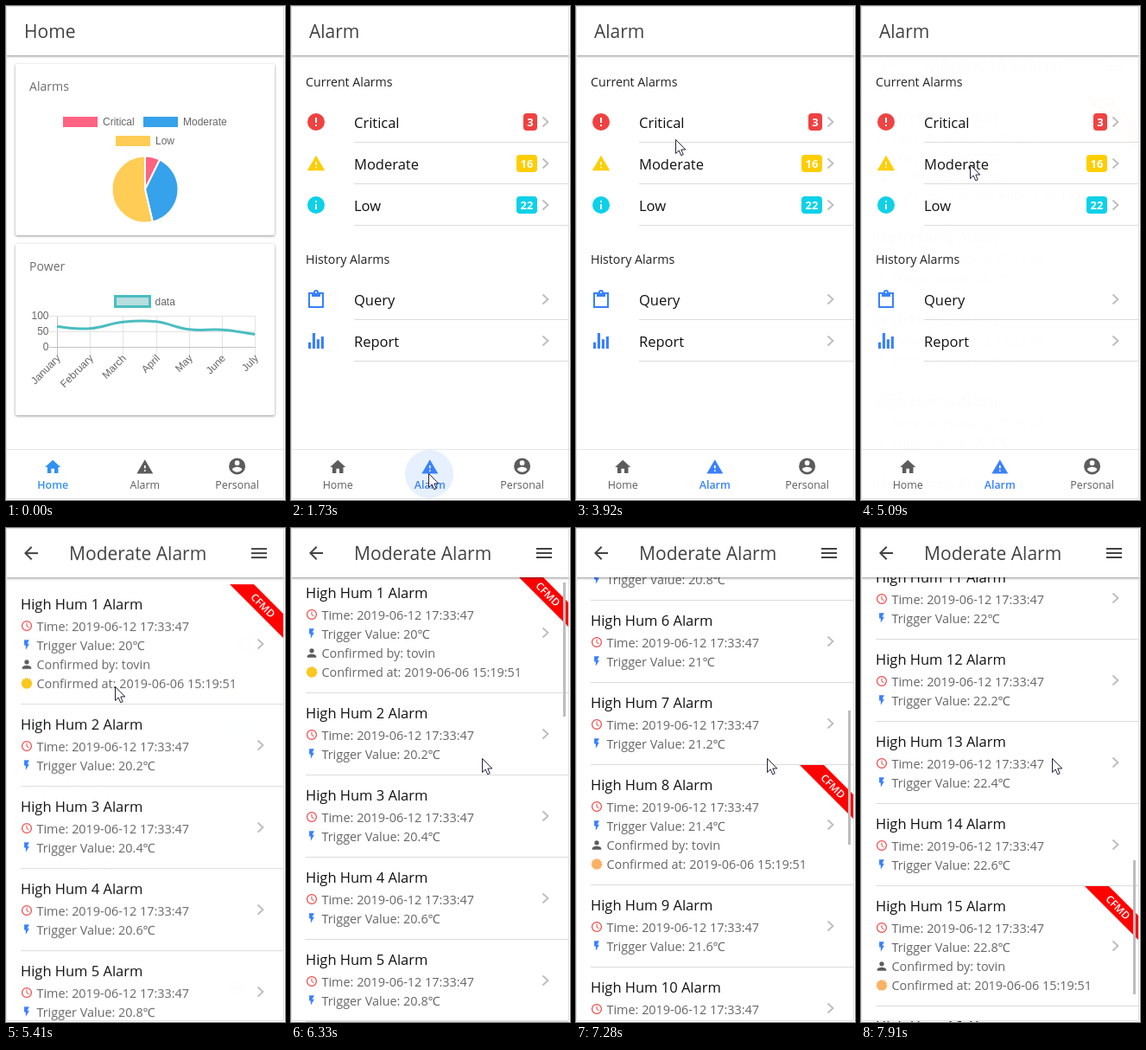
An HTML page for the animation above (7.99 s loop, 323 by 571 pixels).

```html
<!DOCTYPE html>
<html lang="en">
<head>
<meta charset="utf-8">
<title>Alarm app</title>
<style>
html, body { margin: 0; width: 100%; height: 100%; overflow: hidden; background: #fff; }
svg { display: block; }
text { font-family: "Open Sans", "Noto Sans", "Noto Sans CJK SC", sans-serif; white-space: pre; }
.title { font-size: 21px; fill: #424242; }
.row { font-size: 16.5px; fill: #111; }
.sub { font-size: 14.4px; fill: #666; }
.head { font-size: 14.2px; fill: #222; }
.card { font-size: 14.1px; fill: #6c6c6c; }
.tab { font-size: 12.4px; text-anchor: middle; }
.badge { font-size: 13px; font-weight: 700; fill: #fff; text-anchor: middle; }
.ribbon { font-size: 12px; font-weight: 600; fill: #fff; text-anchor: middle; }
.chart { font: 12px "Liberation Sans", Arial, sans-serif; fill: #666; }
.end { text-anchor: end; }
.bar { fill: #fff; filter: drop-shadow(0 1px 1.5px rgba(0,0,0,.45)); }
.box { fill: #fff; filter: drop-shadow(0 1px 1.5px rgba(0,0,0,.42)); }
</style>
</head>
<body>
<svg id="stage" width="323" height="571" viewBox="0 0 323 571"></svg>
<script>
const LOOP = 7990;
const BLUE = '#3880ff', RED = '#f04141', YELLOW = '#ffce00', CYAN = '#0cd1e8', GREY = '#5c5c5c', INK = '#424242';
const SHAPES = {
  home: 'M10 20v-6h4v6h5v-8h3L12 3 2 12h3v8z',
  warning: 'M1 21h22L12 2zM13 18h-2v-2h2zM13 14h-2v-4h2z',
  account: 'M12 2a10 10 0 1 0 0 20 10 10 0 0 0 0-20zM12 5a3 3 0 1 1 0 6 3 3 0 0 1 0-6z' +
    'M12 19.2a7.2 7.2 0 0 1-6-3.2c0-2 4-3.1 6-3.1s6 1.1 6 3.1a7.2 7.2 0 0 1-6 3.2z',
  alert: 'M12 2a10 10 0 1 0 0 20 10 10 0 0 0 0-20zM11 7h2v6h-2zM11 15h2v2h-2z',
  info: 'M12 2a10 10 0 1 0 0 20 10 10 0 0 0 0-20zM11 7h2v2h-2zM11 11h2v6h-2z',
  clipboard: 'M3 4h6a3 3 0 0 1 6 0h6v18H3zM5 6v14h14V6h-2v3H7V6zM12 3a1 1 0 1 0 0 2 1 1 0 0 0 0-2z',
  stats: 'M2 14h3.5v8H2zM7.4 2h3.5v20H7.4zM12.9 10h3.5v12h-3.5zM18.4 6.5h3.5V22h-3.5z',
  person: 'M12 12a4 4 0 1 0 0-8 4 4 0 0 0 0 8zM12 14c-2.7 0-8 1.3-8 4v2h16v-2c0-2.7-5.3-4-8-4z',
  flash: 'M7 2v11h3v9l7-12h-4l4-8z',
  back: 'M20 11H7.8l5.6-5.6L12 4l-8 8 8 8 1.4-1.4L7.8 13H20z',
  menu: 'M3 18h18v-2H3zM3 13h18v-2H3zM3 8h18V6H3z'
};

const text = (x, y, cls, s, more = '') => `<text x="${x}" y="${y}" class="${cls}" ${more}>${s}</text>`;
const rect = (x, y, w, h, fill, more = '') =>
  `<rect x="${x}" y="${y}" width="${w}" height="${h}" fill="${fill}" ${more}/>`;
const path = (d, stroke, width = 1, more = '') =>
  `<path d="${d}" fill="none" stroke="${stroke}" stroke-width="${width}" ${more}/>`;
const icon = (name, x, y, size, fill) =>
  `<path d="${SHAPES[name]}" fill="${fill}" fill-rule="evenodd"
    transform="translate(${x - 12 * size} ${y - 12 * size}) scale(${size})"/>`;
const chevron = y => path(`M291.5 ${y - 5.5}l6 5.5-6 5.5`, '#bcbcbc', 1.8);
const divider = (x, y) => rect(x, y, 321 - x, 1, '#dcdcdc');
const header = (x, s) => rect(0, 0, 323, 57, '#fff', 'class="bar"') + text(x, 37, 'title', s);
const page = (id, body) => `<g id="${id}">${rect(0, 0, 323, 571, '#fff')}${body}</g>`;

function tabs(active, color) {
  const tab = (name, label, x, size, dy) => {
    const on = label === active, fill = on ? color : GREY;
    return icon(name, x, 532 + dy, size, fill) +
      text(x, 558, 'tab', label, `fill="${fill}" font-weight="${on ? 600 : 400}"`);
  };
  return rect(0, 512, 323, 1, '#e6e6e6') + tab('home', 'Home', 54.2, .9, .9) +
    tab('warning', 'Alarm', 160.8, .86, .8) + tab('account', 'Personal', 267.6, .95, 0);
}

function pie() {
  const counts = [3, 16, 22], fills = ['#ff6384', '#36a2eb', '#ffcd56'];
  const at = n => {
    const a = n / 41 * 2 * Math.PI;
    return `${161 + 38.5 * Math.sin(a)} ${212 - 38.5 * Math.cos(a)}`;
  };
  let sum = 0;
  return counts.map((n, i) => {
    const from = at(sum), to = at(sum += n);
    return `<path d="M161 212L${from}A38.5 38.5 0 ${n > 20.5 ? 1 : 0} 1 ${to}Z"
      fill="${fills[i]}" stroke="#fff" stroke-width="2"/>`;
  }).join('');
}

function lineChart() {
  const months = ['January', 'February', 'March', 'April', 'May', 'June', 'July'];
  const pts = [65, 59, 80, 81, 56, 55, 40].map((v, i) => [59 + i * 38.2, 394 - v * .36]);
  let out = '';
  months.forEach((m, i) => {
    const x = Math.round(pts[i][0]);
    out += rect(x, 358, 1, 46, i ? '#e3e3e3' : '#c2c2c2') +
      text(0, 4, 'chart end', m, `transform="translate(${x + 2} 405) rotate(-45)"`);
  });
  [100, 50, 0].forEach((v, i) => {
    const y = 358 + i * 18;
    out += rect(50, y, 239, 1, v ? '#e3e3e3' : '#c2c2c2') + text(49.5, y + 4, 'chart end', v);
  });
  // Each control point leans along the line between a point's neighbours
  const lean = (i, k) => {
    const a = pts[Math.max(i - 1, 0)], b = pts[Math.min(i + 1, 6)];
    return pts[i].map((c, j) => c + k * (b[j] - a[j])).join(' ');
  };
  let d = 'M' + pts[0].join(' ');
  for (let i = 1; i < 7; i++) d += `C${lean(i - 1, .2)} ${lean(i, -.2)} ${pts[i].join(' ')}`;
  return out + path(d, '#4bbdc0', 3);
}

const home = () => page('home',
  rect(11, 67, 300, 198, '#fff', 'rx="2" class="box"') + text(27, 98, 'card', 'Alarms') +
  rect(66, 128, 40, 12, '#ff6384') + text(112, 138, 'chart', 'Critical') +
  rect(159, 128, 40, 12, '#36a2eb') + text(205, 138, 'chart', 'Moderate') +
  rect(127, 150, 40, 12, '#ffcd56') + text(173, 160, 'chart', 'Low') + pie() +
  rect(11, 275, 300, 198, '#fff', 'rx="2" class="box"') + text(27, 306, 'card', 'Power') +
  rect(126.5, 335.5, 40, 12, '#b7dfdf', 'stroke="#4bbdc0" stroke-width="3"') +
  text(172.5, 346, 'chart', 'data') + lineChart() +
  header(21, 'Home') + tabs('Home', '#3390f2'));

function alarm() {
  const row = (name, y, label, color, size, count) => {
    const w = count > 9 ? 24 : 16;
    return icon(name, 29, y, size, color) + text(73, y + 6.5, 'row', label) + chevron(y) + divider(73, y + 23) +
      (count ? rect(285 - w, y - 10, w, 20, color, 'rx="4"') + text(285 - w / 2, y + 4.7, 'badge', count) : '');
  };
  return page('alarm',
    text(17, 93, 'head', 'Current Alarms') +
    row('alert', 134, 'Critical', RED, 1, 3) +
    row('warning', 182, 'Moderate', YELLOW, .93, 16) +
    row('info', 230, 'Low', CYAN, 1, 22) +
    text(17, 298, 'head', 'History Alarms') +
    row('clipboard', 339, 'Query', BLUE, 1) +
    row('stats', 387, 'Report', BLUE, .9) +
    header(21, 'Alarm') + tabs('Alarm', BLUE) +
    `<clipPath id="cell">${rect(109, 513, 105, 56, '#000')}</clipPath>
     <circle id="ripple" cx="160" cy="541" fill="${BLUE}" clip-path="url(#cell)"/>`);
}

function list() {
  let y = 64, items = '';
  for (let n = 1; n <= 16; n++) {
    const confirmed = n % 7 === 1, h = confirmed ? 139 : 95;
    const line = (dy, s) => text(35.5, y + dy, 'sub', s);
    if (confirmed) items +=
      `<path d="M259 ${y + 1}h28l34 34v28z" fill="#f00"/>` +
      text(0, 4.3, 'ribbon', 'CFMD', `transform="translate(297.5 ${y + 25.5}) rotate(45)"`) +
      icon('person', 24, y + 93.5, .66, GREY) + line(99, 'Confirmed by: tovin') +
      `<circle cx="24" cy="${y + 115.5}" r="5.6" fill="${n > 1 ? '#fcb264' : '#fbc81c'}"
        stroke="${n > 1 ? '#f9a951' : '#f3bb12'}" stroke-width="1.4" stroke-dasharray="1.6 1"/>` +
      line(121, 'Confirmed at: 2019-06-06 15:19:51');
    items += text(17, y + 30, 'row', `High Hum ${n} Alarm`) +
      `<circle cx="24" cy="${y + 49}" r="5.4" fill="none" stroke="${RED}" stroke-width="1.2"/>` +
      path(`M24 ${y + 45.7}v3.6l2.6 1.6`, RED) + line(55, 'Time: 2019-06-12 17:33:47') +
      icon('flash', 24, y + 71, .58, BLUE) +
      line(77, `Trigger Value: ${+(19.8 + n * .2).toFixed(1)}℃`) +
      chevron(y + Math.ceil(h / 2)) + divider(17, y + h);
    y += h;
  }
  return page('list', `<g id="items">${items}</g>` + rect(315, 60, 3, 155, '#bdbdbd', 'id="thumb"') +
    header(73, 'Moderate Alarm') + icon('back', 29, 29, 1, INK) + icon('menu', 293, 29, 1, INK));
}

const $ = id => document.getElementById(id);
$('stage').innerHTML = home() + alarm() + list() +
  `<path id="pointer" d="M.5.5V16.5L4.2 13l2.5 5.8 2.5-1.1L6.8 12H11.8Z" fill="#fff" stroke="#22223a"/>` +
  `<rect x=".5" y=".5" width="321" height="569" fill="none" stroke="#dedede"/>`;

// Number of steps already taken when n steps fall evenly from a to b
const steps = (t, a, b, n) =>
  t < a ? 0 : Math.min(n, 1 + Math.floor((t - a) / (b - a) * (n - 1) + .01));
const swing = p => (1 - Math.cos(Math.PI * p)) / 2;

// start, end, steps, then evenly timed points
const MOVES = [
  [550, 1090, 8, [232, 572], [159, 540]],
  [2580, 3370, 11, [159, 540], [113, 417], [80, 236], [100, 158]],
  [3450, 3600, 3, [100, 158], [106, 133]],
  [3750, 4220, 7, [106, 133], [126, 183]],
  [5930, 6180, 4, [126, 183], [221, 266]]
];

function pointerAt(t) {
  const [a, b, n, ...pts] = MOVES.filter((m, i) => !i || t >= m[0]).pop();
  const p = steps(t, a, b, n) / n * (pts.length - 1);
  const i = Math.min(Math.floor(p), pts.length - 2);
  return pts[i].map((c, j) => Math.round(c + (pts[i + 1][j] - c) * (p - i)));
}

function scrollAt(t) {
  return Math.round(200 * swing(steps(t, 6330, 6730, 6) / 6) +
    300 * swing(steps(t, 6870, 7280, 6) / 6) +
    598.7 * swing(steps(t, 7500, 7910, 6) / 7));
}

const show = (id, on) => $(id).setAttribute('display', on ? 'inline' : 'none');
const shift = (id, x, y) => $(id).setAttribute('transform', `translate(${x} ${y})`);

function draw(t) {
  show('home', t < 1730);
  show('alarm', t >= 1730 && t < 5480);
  show('list', t >= 5090);

  show('ripple', t < 2030);
  $('ripple').setAttribute('r', t < 1800 ? 28 : 60);
  $('ripple').setAttribute('opacity', t < 1950 ? .12 : .05);

  const enter = Math.max(0, steps(t, 5090, 5480, 6) - 1) / 5;
  const eased = 1 - (1 - enter) ** 4;
  $('list').setAttribute('opacity', .015 + .985 * eased);
  shift('list', 0, 40 * (1 - eased));

  const scroll = scrollAt(t);
  shift('items', 0, -scroll);
  show('thumb', t >= 5640);
  shift('thumb', 0, Math.floor(scroll * .3035));

  shift('pointer', ...pointerAt(t));
}

const begin = performance.now();
function tick() {
  draw((performance.now() - begin) % LOOP);
  requestAnimationFrame(tick);
}
tick();
</script>
</body>
</html>
```
